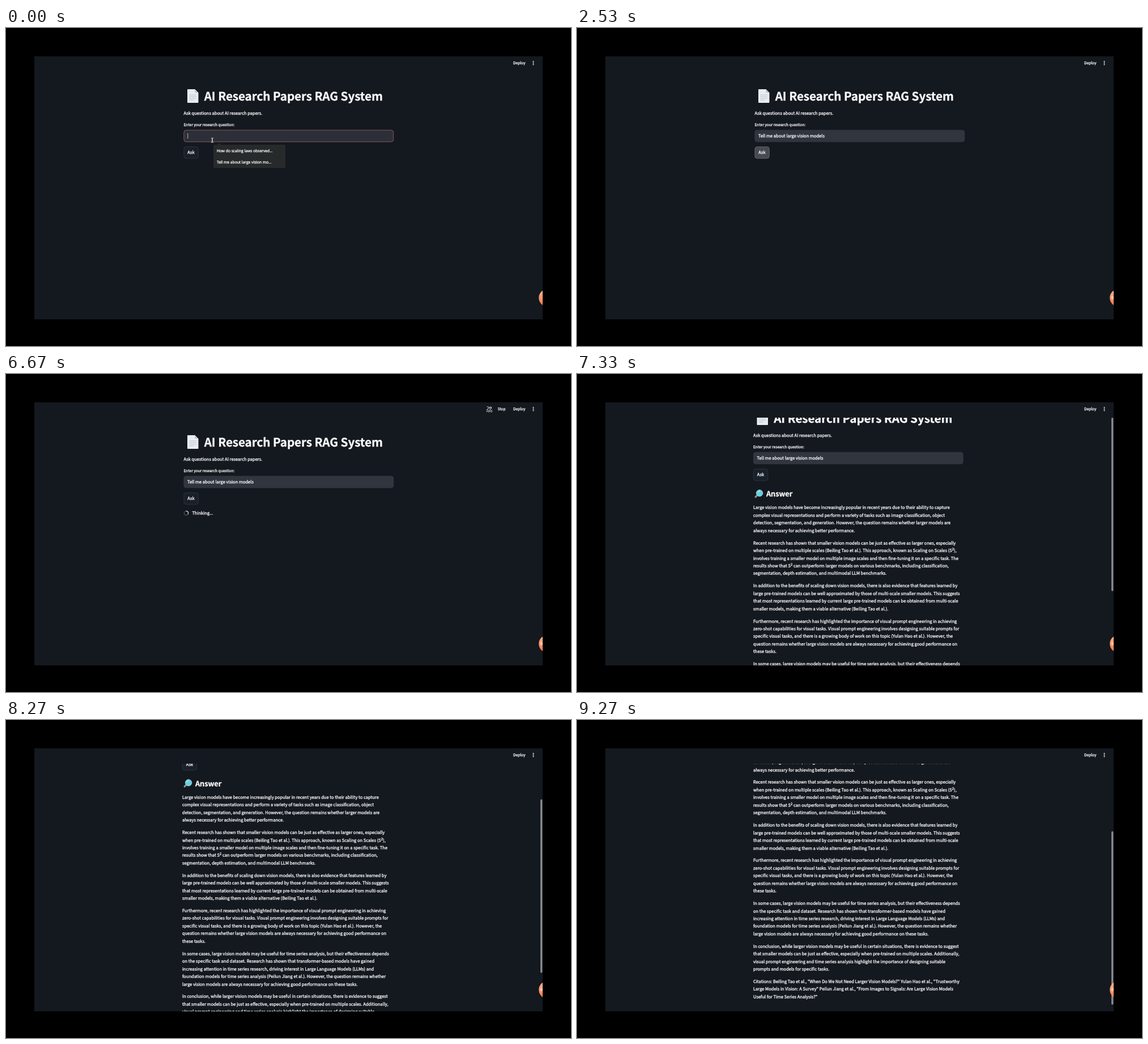
An HTML page for the animation above (9.47 s loop, 997 px wide and 561 px high).

```html
<!DOCTYPE html>
<html lang="en">
<head>
<meta charset="utf-8">
<title>Research paper assistant</title>
<style>
  html, body { margin: 0; width: 100%; height: 100%; overflow: hidden; background: #000; }
  svg { display: block; width: 997px; height: 561px; }
  text { fill: #fafafa; stroke: #fafafa; stroke-width: .3px; white-space: pre; text-rendering: geometricPrecision;
         font: 7.53px "Noto Sans CJK SC", "Noto Sans CJK JP", "Noto Sans CJK", "Noto Sans CJK KR", sans-serif; }
  .small { font-size: 6.59px; }
  .title { font-size: 20.7px; font-weight: 700; letter-spacing: -.005em; }
  .heading { font-size: 12.8px; font-weight: 700; letter-spacing: -.005em; }
  .menu text { font: 6.7px "Open Sans", sans-serif; }
  .line { fill: none; stroke: #fafafa; stroke-linecap: round; stroke-linejoin: round; }
</style>
</head>
<body>
<svg viewBox="0 0 997 561">
  <defs>
    <clipPath id="panel"><rect x="50" y="50" width="897" height="464"/></clipPath>
    <clipPath id="page"><rect x="50" y="77" width="897" height="437"/></clipPath>
    <linearGradient id="orange" x2="0" y2="1">
      <stop stop-color="#ffb890"/><stop offset="1" stop-color="#f87546"/>
    </linearGradient>
  </defs>
  <rect width="997" height="561"/>
  <rect x="50" y="50" width="897" height="464" fill="#14181f"/>

  <g clip-path="url(#page)"><g id="content">
    <path d="M320.5 108.5h13l5.5 5.5v17.5h-18.5z" fill="#e9edf1" stroke="#e9edf1" stroke-linejoin="round"/>
    <path d="M333.5 108.5v5.5h5.5z" fill="#b9c2ca"/>
    <path d="M323.5 118h12.5m-12.5 3h12.5m-12.5 3h12.5m-12.5 3h8" stroke="#b4bdc6" stroke-width=".9"/>
    <text class="title" x="349.7" y="128.4">AI Research Papers RAG System</text>
    <text x="313.5" y="152.6">Ask questions about AI research papers.</text>
    <text class="small" x="313.5" y="173.4">Enter your research question:</text>
    <rect id="field" x="313.9" y="180.2" width="369.8" height="20.6" rx="4"/>
    <text id="query" x="320" y="192.7">Tell me about large vision models</text>
    <path id="caret" d="M320.8 185.5v9.5" stroke="#d8dadd" stroke-width=".8"/>
    <rect id="button" x="313.9" y="209.5" width="25.4" height="20.6" rx="4" stroke-width=".8"/>
    <text x="326.5" y="222.3" text-anchor="middle">Ask</text>
    <g id="thinking">
      <circle cx="318" cy="245.4" r="3.7" fill="none" stroke="#555a62" stroke-width="1.1"/>
      <path id="arc" class="line" d="M318 241.7a3.7 3.7 0 0 1 3.2 5.55" stroke-width="1.1"/>
      <text x="328.4" y="248.2">Thinking...</text>
    </g>
    <g id="answer">
      <path d="M321 255.5l-3.4 3.4" stroke="#8d9298" stroke-width="3" stroke-linecap="round"/>
      <circle cx="324.6" cy="252.2" r="5.7" fill="#5fd3e2" stroke="#b5c3ca" stroke-width="1"/>
      <path class="line" d="M321.6 250.8q1-2.3 3.3-2.4" stroke-width=".9"/>
      <text class="heading" x="336.4" y="258.5">Answer</text>
    </g>
  </g></g>

  <g id="menu" class="menu">
    <path d="M372 206.5l4-3.2 4 3.2z" fill="#272a2b"/>
    <rect x="366" y="206" width="127" height="41" rx="2.5" fill="#272a2b"/>
    <rect id="hover" x="366" y="227" width="127" height="18" fill="#3a3d3f"/>
    <text x="372" y="219.4">How do scaling laws observed...</text>
    <text x="372" y="238.5">Tell me about large vision mo...</text>
  </g>

  <g id="running">
    <g id="icon" transform="translate(853 62)"></g>
    <text class="small" x="867.4" y="64">Stop</text>
  </g>
  <text class="small" x="895" y="64">Deploy</text>
  <path class="line" d="M930.5 59v0m0 2.8v0m0 2.8v0" stroke-width="2"/>

  <rect id="thumb" x="943" width="3.4" height="306" rx="1.7" fill="#858990"/>
  <g clip-path="url(#panel)">
    <circle cx="955.6" cy="476" r="15.4" fill="url(#orange)"/>
    <text id="timer" class="small" x="943" y="478.4">0:00</text>
  </g>
  <g id="pointer">
    <path id="beam" class="line" d="M-1.8-4q1.8 0 1.8 1v6q0 1 1.8 1m-3.6 0q1.8 0 1.8-1v-6q0-1 1.8-1" stroke-width=".8"/>
    <path id="arrow" d="M0 0v8.5l2-1.8 1.3 2.9 1.3-.6-1.3-2.8h2.7z" fill="#fff" stroke="#111" stroke-width=".5"/>
  </g>
</svg>

<script>
const LOOP = 9470, STEP = 1000 / 15;
const $ = id => document.getElementById(id);
const show = (id, on) => $(id).style.display = on ? '' : 'none';
const paint = (id, fill, stroke) => {
  $(id).setAttribute('fill', fill);
  $(id).setAttribute('stroke', stroke);
};
const move = (id, x, y) => $(id).setAttribute('transform', `translate(${x} ${y})`);

const answer = `Large vision models have become increasingly popular in recent years due to their ability to capture
complex visual representations and perform a variety of tasks such as image classification, object
detection, segmentation, and generation. However, the question remains whether larger models are
always necessary for achieving better performance.

Recent research has shown that smaller vision models can be just as effective as larger ones, especially
when pre-trained on multiple scales (Beiling Tao et al.). This approach, known as Scaling on Scales (S^2),
involves training a smaller model on multiple image scales and then fine-tuning it on a specific task. The
results show that S^2 can outperform larger models on various benchmarks, including classification,
segmentation, depth estimation, and multimodal LLM benchmarks.

In addition to the benefits of scaling down vision models, there is also evidence that features learned by
large pre-trained models can be well approximated by those of multi-scale smaller models. This suggests
that most representations learned by current large pre-trained models can be obtained from multi-scale
smaller models, making them a viable alternative (Beiling Tao et al.).

Furthermore, recent research has highlighted the importance of visual prompt engineering in achieving
zero-shot capabilities for visual tasks. Visual prompt engineering involves designing suitable prompts for
specific visual tasks, and there is a growing body of work on this topic (Yulan Hao et al.). However, the
question remains whether large vision models are always necessary for achieving good performance on
these tasks.

In some cases, large vision models may be useful for time series analysis, but their effectiveness depends
on the specific task and dataset. Research has shown that transformer-based models have gained
increasing attention in time series research, driving interest in Large Language Models (LLMs) and
foundation models for time series analysis (Peilun Jiang et al.). However, the question remains whether
large vision models are always necessary for achieving good performance on these tasks.

In conclusion, while larger vision models may be useful in certain situations, there is evidence to suggest
that smaller models can be just as effective, especially when pre-trained on multiple scales. Additionally,
visual prompt engineering and time series analysis highlight the importance of designing suitable
prompts and models for specific tasks.

Citations: Beiling Tao et al., "When Do We Not Need Larger Vision Models?" Yulan Hao et al., "Trustworthy
Large Models in Vision: A Survey" Peilun Jiang et al., "From Images to Signals: Are Large Vision Models
Useful for Time Series Analysis?"`;

let baseline = 280.4, markup = '';
for (const line of answer.split('\n')) {
  const text = line.replace(/\^2/g, '<tspan baseline-shift="2.7" font-size="6">2</tspan>');
  if (line) markup += `<text x="313.5" y="${baseline}">${text}</text>`;
  baseline += line ? 13.46 : 8.4;
}
$('answer').insertAdjacentHTML('beforeend', markup);

// Activity icons: head x, head y, limbs
const wave = y => `M-5 ${y}q1.25-1.3 2.5 0t2.5 0 2.5 0 2.5 0`;
const ring = (x, y, r) => `M${x - r} ${y}a${r} ${r} 0 1 0 ${2 * r} 0a${r} ${r} 0 1 0 ${-2 * r} 0`;
const icons = [
  [1.5, -4.2, 'M-3-.5L-1.5-2.3 1-2.2 2.3-.4 4-.4M.6-2L-.4.8 1.6 2.2V5M-.4.8L-1.5 3-4 3.4'],
  [3.2, -2.2, 'M-4-4.2L-.8-3.6 2 .2M3-4.4L-4 .2' + wave(2) + wave(4.4)],
  [1.5, -4.2, 'M3.5-1.2H1.5L0-2.5-2 0 .4 1.2V4' + ring(-3, 2.8, 1.9) + ring(3, 2.8, 1.9)],
  [2.2, -4.2, 'M-2.5-2.4L1-2.2-.8.5H2.2L3.4 4' + ring(-1.4, 2.3, 2.3)],
  [0, -4.2, 'M-4-2.4L0-2 4-2.4M0-2V1L-2 5M0 1L2 5']
];

// Linear interpolation over [time, ...values] keys
function track(t, keys) {
  const i = keys.findIndex(k => k[0] > t);
  if (i === 0) return keys[0].slice(1);
  if (i < 0) return keys[keys.length - 1].slice(1);
  const [a, b] = [keys[i - 1], keys[i]], p = (t - a[0]) / (b[0] - a[0]);
  return a.slice(1).map((v, n) => v + (b[n + 1] - v) * p);
}
const pointerPath = [[0, 364, 198], [200, 368, 208], [530, 400, 234], [800, 402, 235], [1000, 440, 217],
  [1260, 440, 217], [1340, 432, 216], [1460, 432, 216], [2000, 352, 217], [2400, 343, 219]];
const scrollPath = [[7200, 0], [7533, 105], [7734, 105], [7867, 122.7], [8267, 141.6], [8533, 157.5],
  [8734, 157.5], [9133, 210], [9200, 210], [9266, 230.2]];

function draw(t) {
  const filled = t > 790, clicked = t > 2460, thinking = t > 2720 && t < 6790, done = t > 6790;
  const pressed = clicked && t < 2720, running = t > 2990 && t < 6790;
  show('query', filled);
  show('caret', !filled && t % 1000 < 500);
  show('menu', !filled);
  show('hover', t > 460);
  show('thinking', thinking);
  show('running', running);
  show('answer', done);
  show('thumb', done);
  show('timer', t > 1060);
  show('pointer', !clicked);

  paint('field', clicked ? '#31353e' : '#2c2f38', clicked ? '#383c45' : '#a0656b');
  $('field').setAttribute('stroke-width', .8);
  if (pressed) paint('button', '#474b51', '#6b6e74');
  else paint('button', clicked ? '#18202a' : '#1b1f28', '#343a44');

  const [x, y] = track(t, pointerPath);
  move('pointer', x, y);
  show('beam', y < 202);
  show('arrow', y >= 202);

  $('arc').setAttribute('transform', `rotate(${(t % 1000) * .36 + 120} 318 245.4)`);
  const [hx, hy, limbs] = icons[Math.floor(t / 250) % icons.length];
  $('icon').innerHTML = `<circle cx="${hx}" cy="${hy}" r="1.1" fill="#fafafa"/>
    <path class="line" d="${limbs}" stroke-width=".9"/>`;

  const [scroll] = track(t, scrollPath);
  move('content', done ? -2.5 : 0, -scroll);
  $('thumb').setAttribute('y', 50.5 + scroll * .633);
}

function tick() {
  const t = performance.now() % LOOP;
  draw(Math.floor((t + 5) / STEP) * STEP);
  requestAnimationFrame(tick);
}
tick();
</script>
</body>
</html>
```
